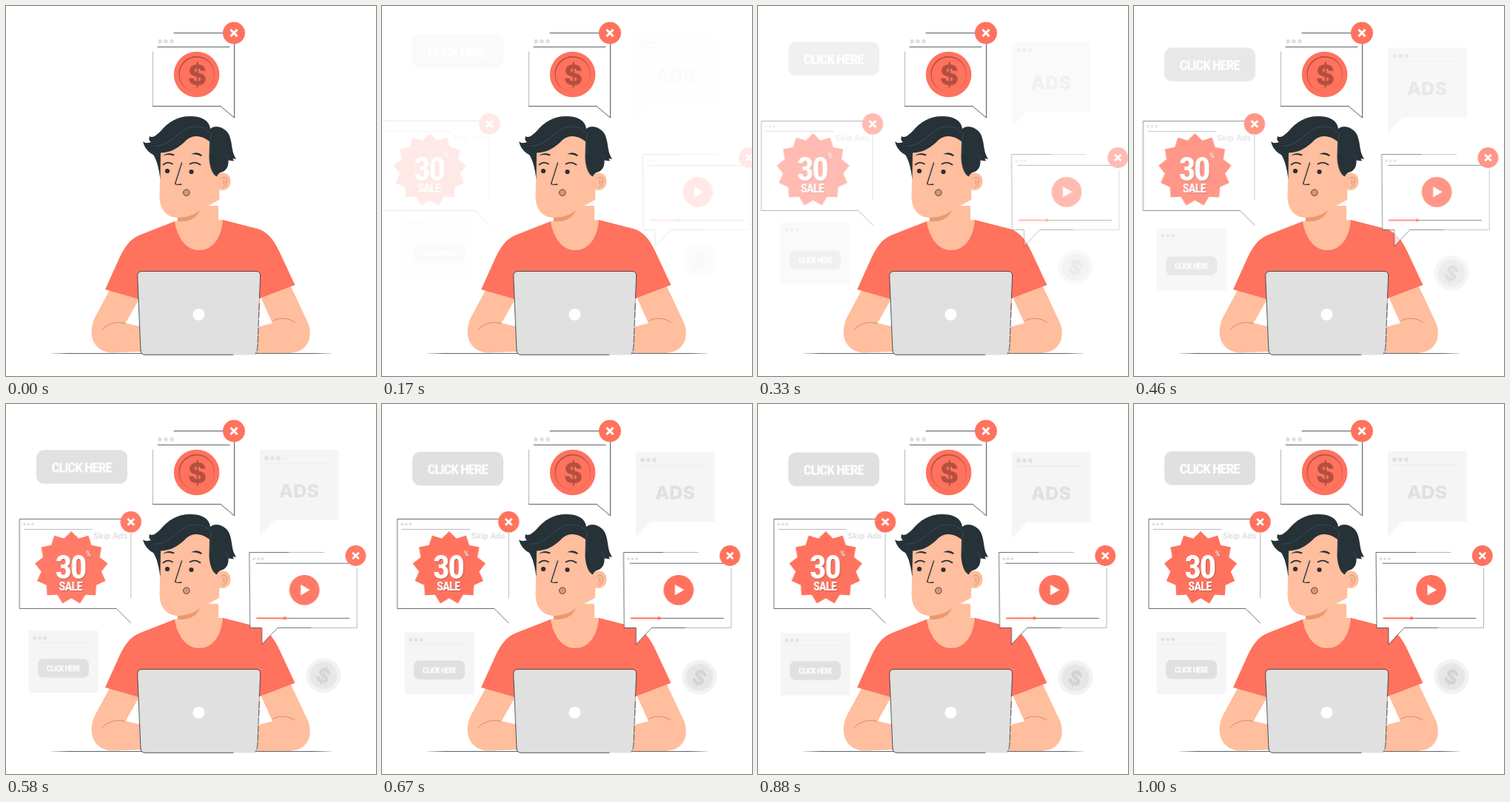
An HTML page for the animation above (1040 ms loop, 500 px wide and 500 px high).

```html
<!DOCTYPE html>
<html lang="en">
<head>
<meta charset="utf-8">
<title>Pop-up ads</title>
<style>
  html, body { margin: 0; width: 100%; height: 100%; overflow: hidden; background: #fff; }
  svg { display: block; width: 100vw; height: 100vh; }
  text { text-anchor: middle; font-family: Inter, "Open Sans", sans-serif; font-weight: 800; }
  .narrow { font-family: "Roboto Condensed", Roboto, sans-serif; font-stretch: 75%; font-weight: 700; letter-spacing: -.055em; fill: #fff; }
  .cast { filter: drop-shadow(1.2px 1.2px 0 #c4574a); }
  .ink { fill: none; stroke: #263238; stroke-width: .8; stroke-linejoin: round; stroke-linecap: round; }
  .faint { stroke-width: .35; }
  .face { stroke-width: 1.7; }
  .crease { fill: none; stroke: #c98a68; stroke-width: .9; stroke-linecap: round; }
  .coral { fill: #ff725e; }
  .skin { fill: #ffbe9d; }
  .shade { fill: #eb996e; }
  .hair { fill: #263238; }
  .grey { fill: #e0e0e0; }
  .pale { fill: #f5f5f5; }
  .rule { stroke: #ebebeb; stroke-width: .9; }
  .white { fill: #fff; }
  .cross { fill: none; stroke: #fff; stroke-width: 2.9; }
</style>
</head>
<body>
<svg viewBox="0 0 500 500">
  <defs>
    <g id="close">
      <circle class="coral" r="15"/>
      <path class="cross" d="M-4.6-4.6 4.6 4.6M4.6-4.6-4.6 4.6"/>
    </g>
    <g id="dots" class="grey">
      <circle r="2.8"/><circle cx="8" r="2.8"/><circle cx="16" r="2.8"/>
    </g>
    <linearGradient id="fade" gradientUnits="userSpaceOnUse" x1="61" y1="0" x2="440" y2="0">
      <stop offset="0" stop-color="#263238" stop-opacity=".2"/>
      <stop offset=".06" stop-color="#263238"/>
      <stop offset=".94" stop-color="#263238"/>
      <stop offset="1" stop-color="#263238" stop-opacity=".2"/>
    </linearGradient>
  </defs>

  <!-- desk and man -->
  <path d="M61 469.3H440V469.9H61Z" fill="url(#fade)"/>
  <path class="skin" d="M140 384 120 421C109 445 119 468 144 468.500L184 467 181 433 161.500 428.500 180 396Z"/>
  <path class="skin" d="M384 377 408 428C416 449 407 468 383 469H339L340 434 360 428.500 344 393Z"/>
  <path class="crease" d="M130 437C139 428 150 426 161 429M361 425Q376 418 390 427" />
  <path class="coral" d="M228 291 182 309C168 314 160 326 153 341L134 383 179 396 181 420H342L343 395 390.500 377 369 331C361 314 352 304 338 300.500L293 289 260 310Z"/>
  <path class="skin" d="M228 291 232 290V270H287V289L293 289C291 313 280 330 261 330 243 330 231 312 228 291Z"/>
  <path class="skin" d="M288 227C296 223 303.500 228 303.500 237 303.500 246 296 251 288 248Z"/>
  <path class="skin" d="M209 195 207.500 258C208 276 218 286 233 286 245 286 255 282 262 276L288 262 290 190 270 170 235 172Z"/>
  <path class="shade" d="M232 286C245 286 255 282 262 276 258 287 247 292 232 291Z"/>
  <path class="crease" d="M291 233C296 229 300 233 298 239 297 243 295 244 293 245M294 235Q296 238 294 241"/>
  <path class="hair" d="M185 183C188 186 192 185 196 184 193 182 193 179 194 176 198 179 203 175 209 169 220 156 232 149 249 149 265 149 275 155 276 166 280 162 288 162 294 166 304 172 304 183 306 194 307 200 309 203 311 207L306.500 206 308 209.500 300.500 208.500C301 215 299 223 290 225 287 226 286 228 285 230.500 279 228 275 218 274.500 205L275 183C265 175 253 173 244 181 233 192 223 198 209 198.500L208.500 234C207 222 204 208 199 201 193 198 187 192 185 183Z"/>
  <path d="M200 189C224 191 234 163 256 163 265 163 271 166 274 171M278 171C275 181 276 193 277 200M297 200Q300 205 301 209" fill="none" stroke="#455a64" stroke-width=".6"/>
  <path class="hair" d="M212 202.500Q219 196.500 227.500 200.500L227 202.500Q219 199.500 212 202.500ZM250 200.500Q258 195.500 265 201.500L264 203Q257 199.500 250 200.500Z"/>
  <path class="ink face" d="M212.500 214.500Q218 209.500 225 213.500M248.500 213.500Q256 209.500 262.500 214.500"/>
  <path class="ink" style="stroke-width:1.3" d="M237.500 212 228.500 240.500Q232 242 237 241"/>
  <circle class="hair" cx="218" cy="223" r="3.1"/>
  <circle class="hair" cx="250.500" cy="224" r="3.1"/>
  <circle cx="243.800" cy="252.200" r="4.300" fill="#d99577" stroke="#263238" stroke-width=".8"/>

  <!-- laptop -->
  <path class="grey" d="M184 358.500H338Q344 358.500 343.700 365L339.500 466Q339 471.500 334 471.500H188Q182.500 471.500 182 466L177.700 365Q177.500 358.500 184 358.500Z"/>
  <path class="ink" d="M182 466 177.700 365Q177.500 358.500 184 358.500H338Q344 358.500 343.700 365L342.500 395M182 466Q182.500 471.300 188 471.300H307"/>
  <path class="ink" stroke-dasharray="9 2" d="M342.300 402 340 460Q339.500 467 337 470"/>
  <circle class="white" cx="260.500" cy="417" r="8"/>

  <!-- coin bubble -->
  <path class="ink" d="M227 36.500H296M205 55.300H302M198.500 135.400H290L308.500 151V49"/>
  <path class="ink faint" d="M198.500 62V135"/>
  <use href="#dots" x="208" y="47.800"/>
  <circle class="coral" cx="257.600" cy="92.500" r="30.800"/>
  <circle cx="257.600" cy="92" r="24.200" fill="#b34f41"/>
  <circle class="coral" cx="258" cy="92.900" r="23.400"/>
  <text x="258.500" y="107" font-size="38" fill="#b34f41">$</text>
  <use href="#close" x="308" y="36.500"/>

  <!-- pop-ups -->
  <g data-from="0 -30">
    <rect class="grey" x="41" y="64" width="123" height="45.500" rx="10"/>
    <text class="narrow" x="102" y="94" font-size="19">CLICK HERE</text>
  </g>

  <g data-from="0 -30">
    <path class="pale" d="M343 64H450V158.500H363L343 180Z"/>
    <use href="#dots" x="352" y="75"/>
    <path class="rule" d="M350 82.500H440"/>
    <text class="grey" x="396" y="128" font-size="25">ADS</text>
  </g>

  <g data-from="0 -30">
    <rect class="pale" x="30.500" y="308" width="94" height="84"/>
    <use href="#dots" transform="translate(39 318) scale(.85)"/>
    <path class="rule" d="M38 324H116"/>
    <rect class="grey" x="43" y="346" width="69" height="25.500" rx="7.500"/>
    <text class="narrow" x="77.500" y="362.600" font-size="10.500">CLICK HERE</text>
  </g>

  <g data-from="0 -30">
    <circle cx="429" cy="368.500" r="23.500" fill="#f2f2f2"/>
    <circle cx="429" cy="368.500" r="18.200" fill="#e6e6e6"/>
    <text transform="translate(429 368.500) rotate(22)" y="10" font-size="27" fill="#d3d3d3">$</text>
  </g>

  <g data-from="-30 0">
    <path class="white" d="M20 155.500H170.500V296L151 276.500H20Z"/>
    <path class="ink" d="M157 155.500H20V276.500H151L170.500 296" style="stroke-width:.7"/>
    <path class="ink faint" d="M26 169.400H118M170.500 174V262"/>
    <use href="#dots" transform="translate(26.500 162.500) scale(.7)"/>
    <text class="grey" x="143" y="181.500" font-size="10.800" style="font-weight:700">Skip Ads</text>
    <polygon id="badge" class="coral"/>
    <g class="cast">
      <text class="narrow" x="88.500" y="235.500" font-size="45">30</text>
      <text class="narrow" x="113" y="206" font-size="11" style="font-weight:400">%</text>
      <text class="narrow" x="88.800" y="251.500" font-size="16.500">SALE</text>
    </g>
    <use href="#close" transform="translate(170.500 159.300) scale(.95)"/>
  </g>

  <g data-from="30 0">
    <path class="white" d="M327 200.500H472.500V302.500H365L344 325V302.500H328Z"/>
    <path class="ink" d="M380 200.500H327L328 302.500H344V325L365 302.500H410M336 215.300H462" style="stroke-width:.7"/>
    <path class="ink faint" d="M380 200.500H428M410 302.500H472.500V222"/>
    <use href="#dots" transform="translate(333.500 209.300) scale(.7)"/>
    <circle class="coral" cx="401.500" cy="251.300" r="20.400"/>
    <path class="white" d="M396.500 244 409 251.300 396.500 258.600Z"/>
    <path class="ink" d="M375 289.500H462" style="stroke-width:.7"/>
    <path d="M336.500 289.500H375" stroke="#ff725e" stroke-width="1.800"/>
    <circle class="coral" cx="375" cy="289.500" r="2.200"/>
    <use href="#close" transform="translate(470.800 205) scale(.93)"/>
  </g>
</svg>
<script>
  const LOOP = 1040, FPS = 24, STEPS = 25;

  const points = 13;
  document.getElementById('badge').setAttribute('points',
    Array.from({ length: points * 2 }, (_, i) => {
      const a = i * Math.PI / points, r = i % 2 ? 41 : 49.5;
      return `${(90 + r * Math.sin(a)).toFixed(2)},${(221.500 - r * Math.cos(a)).toFixed(2)}`;
    }).join(' '));

  const cubic = (a, b, s) => 3 * (1 - s) ** 2 * s * a + 3 * (1 - s) * s * s * b + s ** 3;

  // cubic-bezier(.36, -.01, .5, 1.38), which overshoots before settling
  function ease(x) {
    if (x >= 1) return 1;
    let lo = 0, hi = 1;
    for (let i = 0; i < 30; i++) {
      const mid = (lo + hi) / 2;
      if (cubic(.36, .5, mid) < x) lo = mid; else hi = mid;
    }
    return cubic(-.01, 1.38, lo);
  }

  function pose(step, dx, dy) {
    const p = step < 2 ? 0 : ease((step + 1) / FPS);
    return {
      transform: `translate(${dx * (1 - p)}px, ${dy * (1 - p)}px)`,
      opacity: Math.min(1, p),
      easing: 'steps(1, end)'
    };
  }

  for (const el of document.querySelectorAll('[data-from]')) {
    const [dx, dy] = el.dataset.from.split(' ').map(Number);
    const frames = Array.from({ length: STEPS }, (_, k) => ({
      ...pose(k, dx, dy),
      offset: Math.round(k * 100 / FPS) * 10 / LOOP
    }));
    frames.push({ ...pose(STEPS, dx, dy), offset: 1 });
    el.animate(frames, { duration: LOOP, iterations: Infinity });
  }
</script>
</body>
</html>
```
